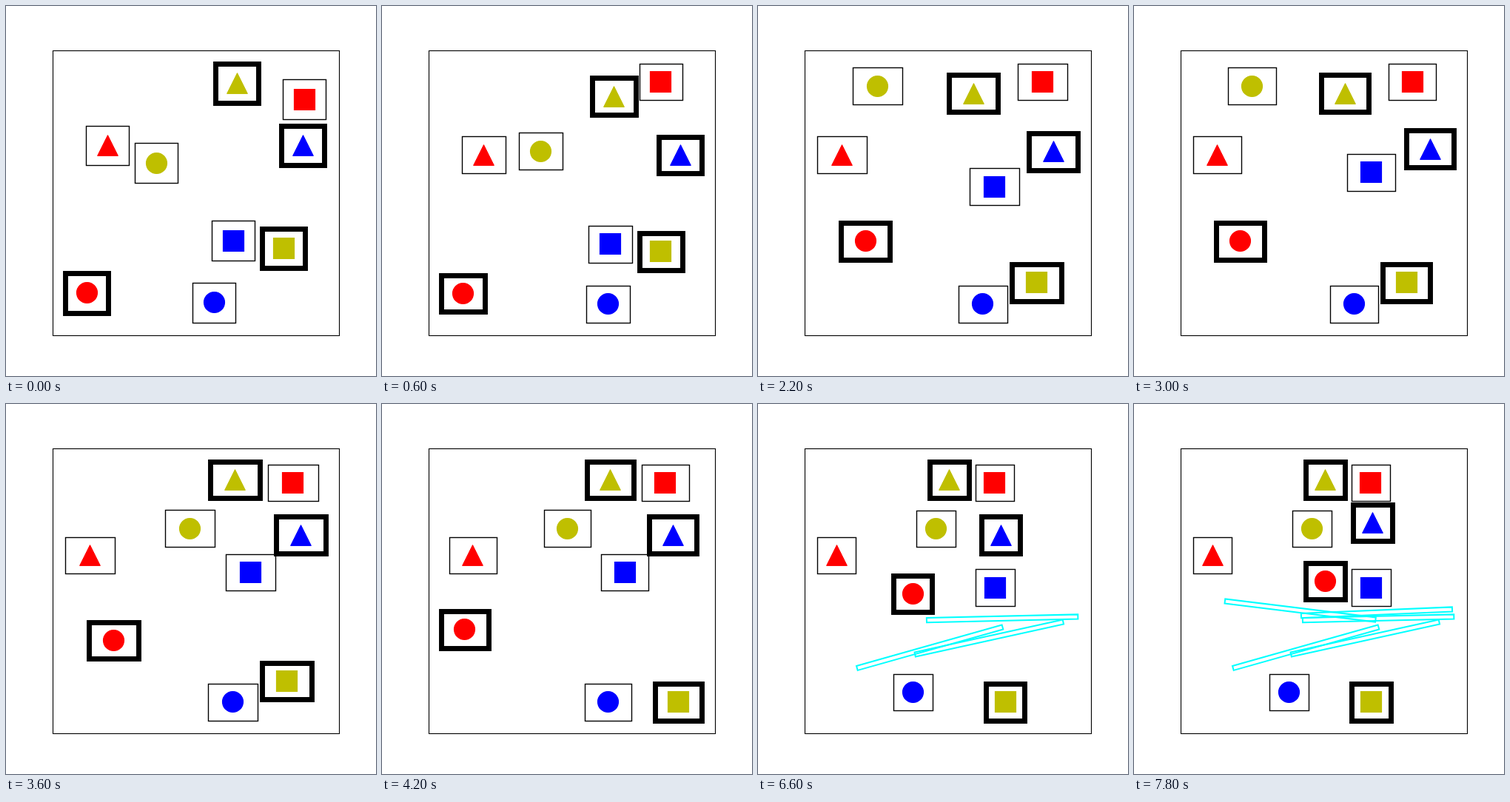
These frames come from a looping animation (500 by 500 pixels, 8 s). An HTML page with a canvas:

```html
<!DOCTYPE html>
<html lang="en">
<head>
<meta charset="utf-8">
<title>Layout search</title>
<style>
  html, body { margin: 0; width: 100%; height: 100%; overflow: hidden; background: #fff; }
  canvas { display: block; }
</style>
</head>
<body>
<canvas id="stage" width="500" height="500"></canvas>
<script>
const ctx = document.getElementById('stage').getContext('2d');
const STEP_MS = 200, STEPS = 40;
const BOX_W = 52.3, BOX_H = 49.25, BAR_THICKNESS = 6.2;
const VIEW = { left: 80.11, top: 77.5, width: 352.27, height: 350 };
const RED = '#ff0000', YELLOW = '#bfbf00', BLUE = '#0000ff';

const items = {
  redTriangle:    { shape: 'triangle', color: RED,    at: [26.3, 204.7] },
  redSquare:      { shape: 'square',   color: RED,    at: [264.6, 147] },
  redCircle:      { shape: 'circle',   color: RED,    at: [1.3, 389.6], bold: true },
  yellowTriangle: { shape: 'triangle', color: YELLOW, at: [183, 126.7], bold: true },
  yellowCircle:   { shape: 'circle',   color: YELLOW, at: [85.5, 226.7] },
  yellowSquare:   { shape: 'square',   color: YELLOW, at: [239.6, 333.4], bold: true },
  blueTriangle:   { shape: 'triangle', color: BLUE,   at: [262.8, 204.9], bold: true },
  blueCircle:     { shape: 'circle',   color: BLUE,   at: [155.4, 401.6] },
  blueSquare:     { shape: 'square',   color: BLUE,   at: [178.6, 323.9] }
};

// Each accepted move: step, item, new centre.
const moves = [
  [1, 'redSquare', 239.6, 107],
  [2, 'yellowCircle', 94.7, 199.6],
  [3, 'blueCircle', 176.1, 403.5],
  [4, 'yellowTriangle', 166, 122.8],
  [5, 'blueSquare', 188.5, 246.9],
  [6, 'redCircle', -2.6, 374],
  [7, 'blueTriangle', 251, 200.1],
  [8, 'yellowSquare', 233.1, 374.9],
  [9, 'yellowCircle', 64.2, 112.9],
  [10, 'redCircle', 51.2, 319.8],
  [12, 'blueSquare', 194.8, 228],
  [14, 'blueTriangle', 259, 196.6],
  [16, 'blueTriangle', 248, 177.5],
  [17, 'yellowTriangle', 178.6, 102.5],
  [18, 'yellowCircle', 131, 168.5],
  [19, 'yellowSquare', 254, 403.5],
  [20, 'redCircle', 17.3, 305.5],
  [23, 'redCircle', 129.2, 256.7],
  [24, 'blueSquare', 212, 230.5],
  [28, 'blueSquare', 259, 240],
  [31, 'yellowCircle', 160.4, 168.7],
  [32, 'blueCircle', 129.4, 390.4],
  [33, 'blueSquare', 240.4, 248.5],
  [35, 'redCircle', 178.4, 239.6],
  [38, 'yellowSquare', 240.4, 403.5],
  [38, 'blueTriangle', 242.4, 151],
  [39, 'blueTriangle', 242.4, 161]
];

// Bars stay once added: step, then both ends of the centre line.
const bars = [
  [26, 132.2, 339, 332.3, 295],
  [29, 53.9, 357.5, 250.4, 302],
  [30, 147.9, 292.6, 352.2, 288],
  [36, 42.9, 267, 246.4, 292],
  [37, 145.9, 286.6, 349.9, 278]
];

const boxCorners = ([x, y]) => [
  [x - BOX_W / 2, y - BOX_H / 2], [x + BOX_W / 2, y + BOX_H / 2]
];

function barCorners([, x1, y1, x2, y2]) {
  const half = BAR_THICKNESS / 2 / Math.hypot(x2 - x1, y2 - y1);
  const nx = (y1 - y2) * half, ny = (x2 - x1) * half;
  return [[x1 + nx, y1 + ny], [x2 + nx, y2 + ny], [x2 - nx, y2 - ny], [x1 - nx, y1 - ny]];
}

// Scales the view so that everything in it just fits.
function fitView(points) {
  const xs = points.map(p => p[0]), ys = points.map(p => p[1]);
  const x0 = Math.min(...xs), y0 = Math.min(...ys);
  const sx = VIEW.width / (Math.max(...xs) - x0);
  const sy = VIEW.height / (Math.max(...ys) - y0);
  return ([x, y]) => [VIEW.left + (x - x0) * sx, VIEW.top + (y - y0) * sy];
}

const snap = v => Math.round(v) + 0.5;

function strokeStyle(color, width) {
  ctx.strokeStyle = color;
  ctx.lineWidth = width;
}

function drawMarker({ shape, color }, x, y) {
  const r = 13.9;
  ctx.beginPath();
  if (shape === 'circle') ctx.arc(x, y, r, 0, Math.PI * 2);
  else if (shape === 'square') ctx.rect(x - r, y - r, 2 * r, 2 * r);
  else {
    ctx.moveTo(x, y - r);
    ctx.lineTo(x + r, y + r);
    ctx.lineTo(x - r, y + r);
    ctx.closePath();
  }
  ctx.fillStyle = color;
  ctx.fill();
  strokeStyle(color, shape === 'triangle' ? 1 : 1.39);
  ctx.stroke();
}

function drawItem(item, at, project) {
  const [[x0, y0], [x1, y1]] = boxCorners(at).map(p => project(p).map(snap));
  strokeStyle('#000', item.bold ? 6.94 : 1.39);
  ctx.strokeRect(x0, y0, x1 - x0, y1 - y0);
  const [x, y] = project(at);
  drawMarker(item, Math.floor(x) + 0.5, Math.floor(y) + 0.5);
}

function drawBar(bar, project) {
  ctx.beginPath();
  barCorners(bar).forEach(p => ctx.lineTo(...project(p)));
  ctx.closePath();
  strokeStyle('#00ffff', 2);
  ctx.stroke();
}

function draw(step) {
  const centres = {};
  for (const name in items) centres[name] = items[name].at;
  for (const [when, name, x, y] of moves) if (when <= step) centres[name] = [x, y];
  const shown = bars.filter(bar => bar[0] <= step);
  const project = fitView([
    ...Object.values(centres).flatMap(boxCorners), ...shown.flatMap(barCorners)
  ]);

  ctx.fillStyle = '#fff';
  ctx.fillRect(0, 0, 500, 500);
  for (const name in items) drawItem(items[name], centres[name], project);
  shown.forEach(bar => drawBar(bar, project));
  strokeStyle('#000', 1.11);
  ctx.strokeRect(63.5, 60.5, 387, 385);
}

const start = performance.now();
function tick() {
  draw(Math.floor((performance.now() - start) / STEP_MS) % STEPS);
  requestAnimationFrame(tick);
}
tick();
</script>
</body>
</html>
```
